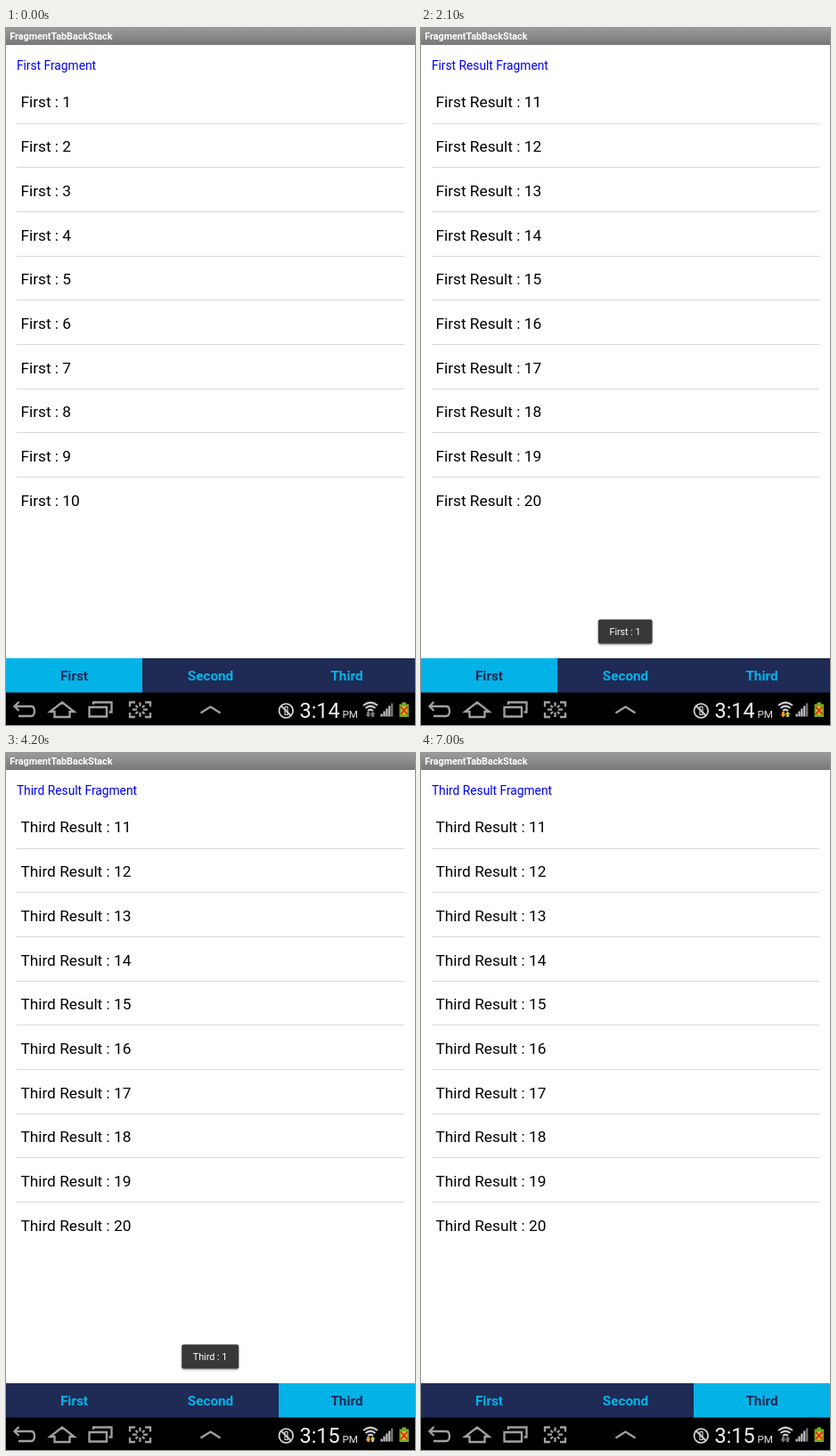
An HTML page for the animation above (7700 ms loop, 459x783 px).

```html
<!DOCTYPE html>
<html>
<head>
<meta charset="utf-8">
<style>
html, body { margin: 0; width: 100%; height: 100%; overflow: hidden; background: #fff }
svg { display: block; font-family: Roboto, sans-serif }
.icon { fill: none; stroke: #a0a0a0; stroke-width: 2.3 }
</style>
</head>
<body>
<svg id="stage" width="459" height="783" viewBox="0 0 459 783">
  <defs>
    <linearGradient id="bar" x2="0" y2="1"><stop stop-color="#9b9b9b"/><stop offset="1" stop-color="#777"/></linearGradient>
    <linearGradient id="line"><stop stop-color="#48b9ee" stop-opacity=".35"/><stop offset=".5" stop-color="#a5e4ff"/><stop offset="1" stop-color="#48b9ee" stop-opacity=".35"/></linearGradient>
    <radialGradient id="glow" cy="0" r=".8"><stop stop-color="#3f9fd0" stop-opacity=".8"/><stop offset="1" stop-color="#2f80b0" stop-opacity="0"/></radialGradient>
    <filter id="shade" x="-10%" y="-20%" width="120%" height="150%"><feDropShadow dx="0" dy="1" stdDeviation="1.2" flood-opacity=".55"/></filter>
  </defs>
  <rect width="459" height="783" fill="#fff"/>
  <rect width="459" height="19" fill="url(#bar)"/>
  <text x="4.3" y="13" font-size="10.75" font-weight="700" fill="#fff">FragmentTabBackStack</text>
  <text id="heading" x="11.9" y="46.5" font-size="13.77" fill="#00f"></text>
  <g id="list" font-size="17.3"></g>
  <g id="toast">
    <rect y="664.5" height="27" rx="2" fill="#373737" filter="url(#shade)"/>
    <text x="229" y="682" font-size="10.7" fill="#fff" text-anchor="middle"></text>
  </g>
  <g id="tabs" font-size="15.3" font-weight="700" text-anchor="middle"></g>

  <rect y="746.5" width="459" height="37"/>
  <g class="icon">
    <path d="M14.5 757 9.5 762 14.5 767M10 762H28Q32 762 32 767.5T28 773H14"/>
    <path d="M49.5 768 63 757.5 76.5 768H71.5V774H54.5V768Z"/>
    <path d="M93.5 763H113V773.5H93.5ZM98 760V757.5H118.5V768.5H115.5"/>
    <path d="M218.5 769.5 229.5 762.5 240.5 769.5"/>
  </g>
  <g id="flash">
    <rect x="128" y="747" width="43" height="36" fill="url(#glow)"/>
    <rect x="128" y="746" width="43" height="2" fill="url(#line)"/>
  </g>
  <path id="capture" class="icon" d="M139 762.5V757.5H145M156 757.5H162V762.5M162 769V774H156M145 774H139V769M150.5 757.5V762M150.5 769V774M142 765.7H147M154 765.7H159M145.5 761 148 763.4M155.5 761 153 763.4M145.5 770.5 148 768M155.5 770.5 153 768"/>

  <g fill="none" stroke="#d2d2d2" stroke-width="1.8">
    <circle cx="314.3" cy="767" r="7.8"/>
    <path d="M308.8 761.5 319.8 772.5"/>
    <path d="M313 762.5H316V771.5H313Z" stroke-width="1.2"/>
  </g>
  <text id="clock" x="329.5" y="775" font-size="23.4" fill="#f2f2f2"></text>
  <text x="377.5" y="774.5" font-size="11.7" fill="#e5e5e5">PM</text>
  <g fill="none" stroke="#c8c8c8" stroke-width="2.2">
    <path d="M401 761Q409 754.5 417 761M403.5 764Q409 759.5 414.5 764M406 767Q409 764.5 412 767"/>
  </g>
  <path id="down" d="M405 768H408V771H409.5L406.5 774.5 403.5 771H405Z"/>
  <path id="up" d="M410 774H413V771H414.5L411.5 767.5 408.5 771H410Z"/>
  <g id="signal"></g>
  <path d="M441.5 759.5H444.5V757.5H449V759.5H452V774H441.5Z" fill="#74ac20"/>
  <rect x="443.5" y="762" width="6.5" height="9.5" fill="#d9b82c"/>
  <path d="M443 762.5 450.5 771M450.5 762.5 443 771" stroke="#df2414" stroke-width="1.7"/>
</svg>
<script>
const STEP = 700;
const names = ['First', 'Second', 'Third'];
const $ = id => document.getElementById(id);

// tab, result page, toast, data arrows lit
const steps = [
  [0, 0, 0, 0], [1, 0, 0, 1], [2, 0, 0, 1], [0, 1, 1, 1],
  [1, 0, 0, 1], [1, 1, 1, 1], [2, 1, 1, 1], [1, 1, 0, 0],
  [0, 1, 0, 1], [0, 0, 0, 1], [2, 1, 0, 0]
];

function add(parent, tag, attrs, text = '') {
  const el = document.createElementNS('http://www.w3.org/2000/svg', tag);
  for (const key in attrs) el.setAttribute(key, attrs[key]);
  el.textContent = text;
  parent.append(el);
  return el;
}

const rows = Array.from({ length: 10 }, (_, i) => {
  if (i < 9) add($('list'), 'rect', { x: 12, y: 107 + Math.floor(49.7 * i), width: 435, height: 1, fill: '#d9d9d9' });
  return add($('list'), 'text', { x: 16.4, y: 89.4 + 49.7 * i });
});
const tabs = names.map((name, i) => ({
  box: add($('tabs'), 'rect', { x: 153 * i, y: 708, width: 153, height: 39 }),
  label: add($('tabs'), 'text', { x: 153 * i + 76.5, y: 733.3 }, name)
}));
for (let i = 0; i < 5; i++) {
  const height = 3 + 3 * i;
  add($('signal'), 'rect', { x: 420.5 + 2.9 * i, y: 773.5 - height, width: 2.2, height, fill: i < 4 ? '#c4c4c4' : '#777' });
}

function show(index) {
  const [tab, result, toast, data] = steps[index];
  const name = names[tab], page = name + (result ? ' Result' : '');
  $('heading').textContent = page + ' Fragment';
  rows.forEach((row, i) => row.textContent = `${page} : ${i + 1 + 10 * result}`);
  tabs.forEach(({ box, label }, i) => {
    box.setAttribute('fill', i === tab ? '#03b3e8' : '#1f2a55');
    label.setAttribute('fill', i === tab ? '#1f2a55' : '#03b3e8');
  });

  $('toast').style.display = toast ? '' : 'none';
  if (toast) {
    const [box, label] = $('toast').children;
    label.textContent = name + ' : 1';
    const width = label.getComputedTextLength() + 25.5;
    box.setAttribute('x', 229.2 - width / 2);
    box.setAttribute('width', width);
  }

  const flash = index === 2;
  $('flash').style.display = flash ? '' : 'none';
  $('capture').style.stroke = flash ? '#d5f2ff' : '#a0a0a0';
  $('clock').textContent = index < 6 ? '3:14' : '3:15';
  $('down').setAttribute('fill', data ? '#f39a20' : '#777');
  $('up').setAttribute('fill', data ? '#b9c936' : '#777');
}

let current = -1;
const start = performance.now();
function tick() {
  const index = Math.floor((performance.now() - start) / STEP) % steps.length;
  if (index !== current) show(current = index);
  requestAnimationFrame(tick);
}
tick();
</script>
</body>
</html>
```
